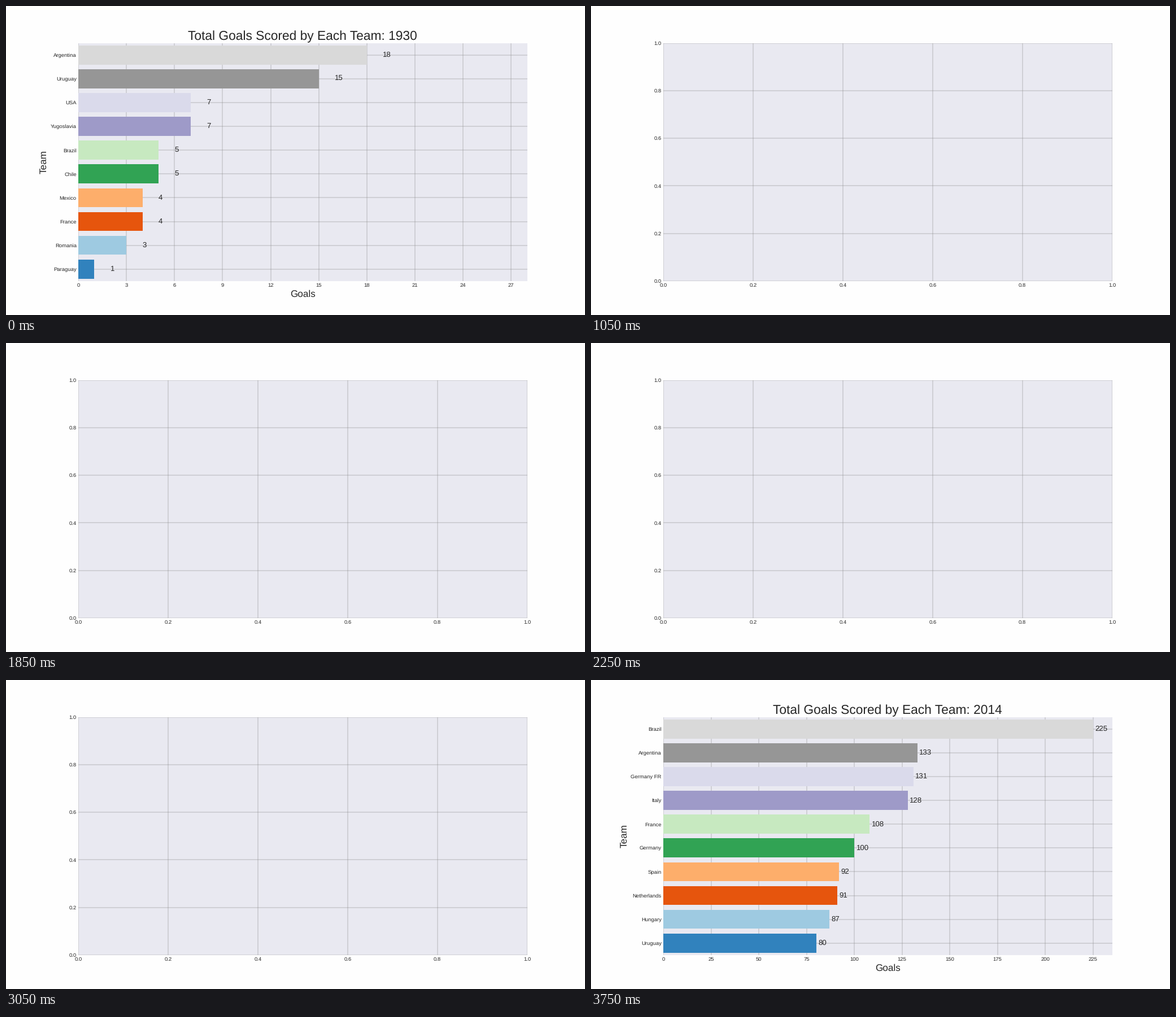
Write a matplotlib script that moves like this. It is 1025 px wide and 547 px high and loops after 3.85 s.

```python
import matplotlib.pyplot as plt
import numpy as np
from matplotlib.animation import FuncAnimation
from matplotlib.ticker import AutoLocator, MaxNLocator

WIDTH, HEIGHT = 1025, 547
DPI = WIDTH / 15
STEP_MS, STEPS = 50, 77
PAPER, PANEL, INK, GRID = "#fefefe", "#e9e9f1", "0.15", "gray"

YEARS = [1930, 1934, 1938, *range(1950, 2015, 4)]

# Turning points (tournament, goals so far); totals grow evenly between them.
GROWTH = {
    "Argentina": [(0, 18), (7, 31), (19, 133)],
    "Austria": [(1, 7), (3, 7), (4, 24)],
    "Brazil": [(0, 5), (1, 6), (6, 80), (19, 225)],
    "Chile": [(0, 5)],
    "England": [(3, 2), (7, 30), (19, 79)],
    "Czechoslovakia": [(1, 9), (4, 14), (6, 30)],
    "Mexico": [(0, 4)],
    "France": [(0, 4), (4, 13), (5, 36), (10, 43), (19, 108)],
    "Germany": [(1, 11), (13, 14), (18, 75), (19, 100)],
    "Germany FR": [(4, 25), (13, 131)],
    "Hungary": [(1, 5), (3, 20), (4, 47), (7, 70), (12, 87)],
    "Italy": [(1, 12), (7, 38), (19, 128)],
    "Netherlands": [(19, 91)],
    "Paraguay": [(0, 1)],
    "Romania": [(0, 3)],
    "Spain": [(1, 4), (12, 37), (19, 92)],
    "Sweden": [(1, 4), (5, 38), (13, 51), (17, 74)],
    "Switzerland": [(1, 5), (6, 27)],
    "USA": [(0, 7)],
    "Uruguay": [(0, 15), (2, 15), (4, 46), (17, 65), (19, 80)],
    "Yugoslavia": [(0, 7), (2, 7), (6, 33), (13, 55)],
}

plt.rcParams.update({
    "font.family": "Liberation Sans",
    "font.size": 10,
    "text.hinting": "none",
    "text.color": INK,
    "axes.labelcolor": INK,
    "xtick.color": INK,
    "ytick.color": INK,
    "xtick.major.size": 0,
    "ytick.major.size": 0,
    "axes.facecolor": PANEL,
    "axes.axisbelow": True,
})

fig, ax = plt.subplots(figsize=(WIDTH / DPI, HEIGHT / DPI), dpi=DPI, facecolor=PAPER)
colors = plt.get_cmap("tab20c")(np.linspace(0, 1, 10))


def goals_so_far(team, cup):
    cups, totals = zip(*GROWTH[team])
    return round(float(np.interp(cup, cups, totals, left=0)))


def top_ten(cup):
    totals = [(team, goals_so_far(team, cup)) for team in GROWTH]
    return sorted(totals, key=lambda item: -item[1])[:10][::-1]


def reset_axes():
    ax.clear()
    ax.spines[:].set_visible(False)
    ax.grid(True, color=GRID, linewidth=0.5)


def draw_empty():
    ax.set(xlim=(0, 1), ylim=(0, 1))
    ax.xaxis.set_major_locator(AutoLocator())
    ax.yaxis.set_major_locator(AutoLocator())


def draw_chart(cup):
    teams, totals = zip(*top_ten(cup))
    rows = range(10)
    ax.barh(rows, totals, height=0.8, color=colors, linewidth=0)
    for row, total in zip(rows, totals):
        ax.text(total + 1, row, str(total), size=14, va="center")
    ax.set(xlim=(0, max(totals) + 10), ylim=(-0.5, 9.5))
    ax.xaxis.set_major_locator(MaxNLocator(10, integer=True))
    ax.set_yticks(rows, teams)
    ax.set_title(f"Total Goals Scored by Each Team: {YEARS[cup]}", size=24)
    ax.set_xlabel("Goals", size=18)
    ax.set_ylabel("Team", size=18)


def scene_at(step):
    # Every scene holds two steps, except one early blank that holds a single step.
    return step // 2 if step < 7 else (step + 1) // 2


def update(step):
    reset_axes()
    cup, blank = divmod(scene_at(step), 2)
    if blank:
        draw_empty()
    else:
        draw_chart(cup)
    return []


anim = FuncAnimation(fig, update, frames=STEPS, interval=STEP_MS,
                     init_func=lambda: [], repeat=True, repeat_delay=0)
plt.show()
```
